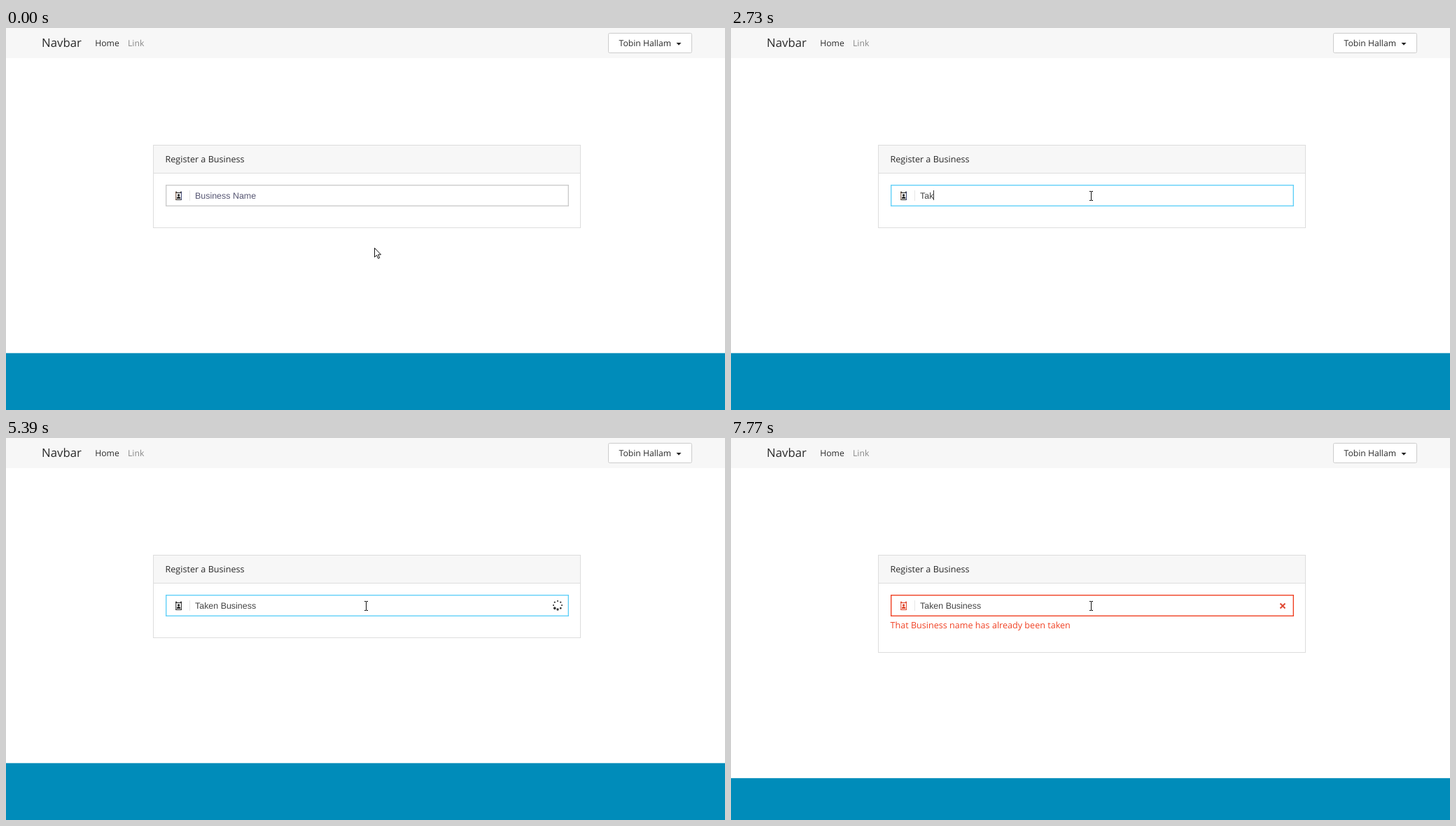
Animation of 1027 by 546 pixels, one loop 8 s. Source, as an HTML page:

```html
<!DOCTYPE html>
<html lang="en">
<head>
<meta charset="utf-8">
<title>Register a Business</title>
<style>
  html, body { margin: 0; width: 100%; height: 100%; overflow: hidden; background: #fff; }
  svg { display: block; }
  text { font: 12.6px "Open Sans", sans-serif; fill: #2a2a2a; text-rendering: geometricPrecision; white-space: pre; }
  .brand { font-size: 16.8px; }
  .nav { font-size: 12.2px; }
  #value { font: 12.45px "Liberation Sans", Arial, sans-serif; }
</style>
</head>
<body>
<svg width="1027" height="546" viewBox="0 0 1027 546">
  <rect width="1027" height="43" fill="#f7f7f7"/>
  <text class="brand" x="51" y="27">Navbar</text>
  <text class="nav" x="127.2" y="26">Home</text>
  <text class="nav" x="174" y="26" style="fill:#888">Link</text>
  <rect x="860.5" y="7.5" width="119" height="28" rx="2" fill="#fff" stroke="#ccc"/>
  <text class="nav" x="875.5" y="26">Tobin Hallam</text>
  <path d="M957.5 21h7l-3.5 3.7z" fill="#222"/>

  <rect id="card" x="210.5" y="167.5" width="610" fill="#fff" stroke="#ddd"/>
  <path d="M211 168h609v39h-609z" fill="#f7f7f7"/>
  <path d="M211 207.5h609" stroke="#ddd"/>
  <text x="227.5" y="192">Register a Business</text>

  <rect id="field" x="228.7" y="224.7" width="574.6" height="29.6" fill="#fff" stroke-width="1.4"/>
  <path d="M262.5 232v15" stroke="#e6e6e6"/>
  <g id="icon">
    <path d="M242.3 234.2h2M248.9 234.2h2M242.3 235.5h8.6M242.3 245.5h8.6" fill="none" stroke="currentColor"/>
    <path id="left" d="M242.8 234v12"/>
    <path id="right" d="M250.4 234v12"/>
    <circle cx="246.6" cy="239" r="1.7" fill="currentColor"/>
    <path d="M243.9 244v-1q.4-2 2.7-2t2.7 2v1z" fill="currentColor"/>
  </g>
  <text id="value" x="270" y="244"></text>
  <rect id="caret" width="1" height="14" fill="#333"/>
  <g id="spinner" fill="#333"></g>
  <path id="cross" d="M784.5 236.5l7 7m0-7l-7 7" stroke="#e04a35" stroke-width="2"/>
  <text id="error" x="227.5" y="272" style="fill:#f04124">That Business name has already been taken</text>

  <rect id="footer" width="1027" height="90" fill="#008cba"/>
  <path id="arrow" d="M.5.5v13l3-2.8 2.2 4.8 2-1-2.2-4.6h4z" fill="#fff" stroke="#111"/>
  <path id="beam" d="M-2.5-6.5h2l.5.5.5-.5h2M0-6v12M-2.5 6.5h2l.5-.5.5.5h2" fill="none" stroke="#111"/>
</svg>
<script>
const LOOP = 8000, STEP = 70, FOCUS = 1540, LOADING = 4970, FAILED = 5460;
const NAME = "Taken Business";
const keyTimes = [2450, 2590, 2730, 2800, 2940, 3080, 3290, 3500, 3640, 3780, 3850, 3920, 4130, 4270];
const spinTimes = [5040, 5180, 5250, 5390];
const caretFlips = [FOCUS, 2030, 2450, 4760, FAILED, 5880, 6370, 6860, 7350, 7770];

const $ = id => document.getElementById(id);
const set = (id, attrs) => { for (const k in attrs) $(id).setAttribute(k, attrs[k]); };
const show = (id, on) => set(id, { visibility: on ? "visible" : "hidden" });
const passed = (times, t) => times.filter(x => x <= t).length;

// Eight dots, the largest at the upper right
$("spinner").innerHTML = [1.65, 1.9, 1.1, 1.1, 1.1, 1.1, 1.1, 1.35].map((r, i) =>
  `<circle cy="-6" r="${r}" transform="rotate(${i * 45})"/>`).join("");

function pointerAt(t) {
  const n = Math.max(0, Math.floor((t - 210) / STEP) + 1);
  if (n > 12) return [514, 246 - 2 * Math.min(3, n - 12)];
  const left = (1 - n / 12) ** 2;
  return [Math.round(514 + 12 * left), Math.round(246 + 68 * left)];
}

function borderAt(t) {
  if (t < FOCUS) return "#ccc";
  if (t < FOCUS + STEP) return "#9ad0e4";
  if (t < FAILED) return "#62d0f8";
  return t < FAILED + STEP ? "#64a9cb" : "#f04124";
}

function draw(t) {
  const failed = t >= FAILED, loading = t >= LOADING && !failed;
  const typed = passed(keyTimes, t);

  set("card", { height: failed ? 139 : 118 });
  set("footer", { y: failed ? 486.2 : 464.7 });
  set("field", { stroke: borderAt(t) });
  show("error", failed);
  show("cross", failed);

  const ink = failed ? "#e04025" : "#222", tinted = t < LOADING;
  $("icon").style.color = ink;
  set("left", { stroke: tinted ? "#6b4630" : ink });
  set("right", { stroke: tinted ? "#30396b" : ink });

  const value = $("value");
  value.textContent = typed ? NAME.slice(0, typed) : "Business Name";
  value.style.fill = typed ? "#444" : t < FOCUS ? "#585874" : "#64646c";
  const width = typed ? value.getComputedTextLength() : 0;
  set("caret", { x: Math.floor(270 + width), y: typed ? 232 : 233 });
  show("caret", passed(caretFlips, t) % 2);

  show("spinner", loading);
  set("spinner", { transform: `translate(788 239) rotate(${45 * passed(spinTimes, t)})` });

  const [x, y] = pointerAt(t), overField = y < 255;
  show("arrow", !overField);
  show("beam", overField);
  set("arrow", { transform: `translate(${x} ${y})` });
  set("beam", { transform: `translate(${x + .5} ${y})` });
}

const start = performance.now();
function frame() {
  draw((performance.now() - start) % LOOP);
  requestAnimationFrame(frame);
}
frame();
</script>
</body>
</html>
```
